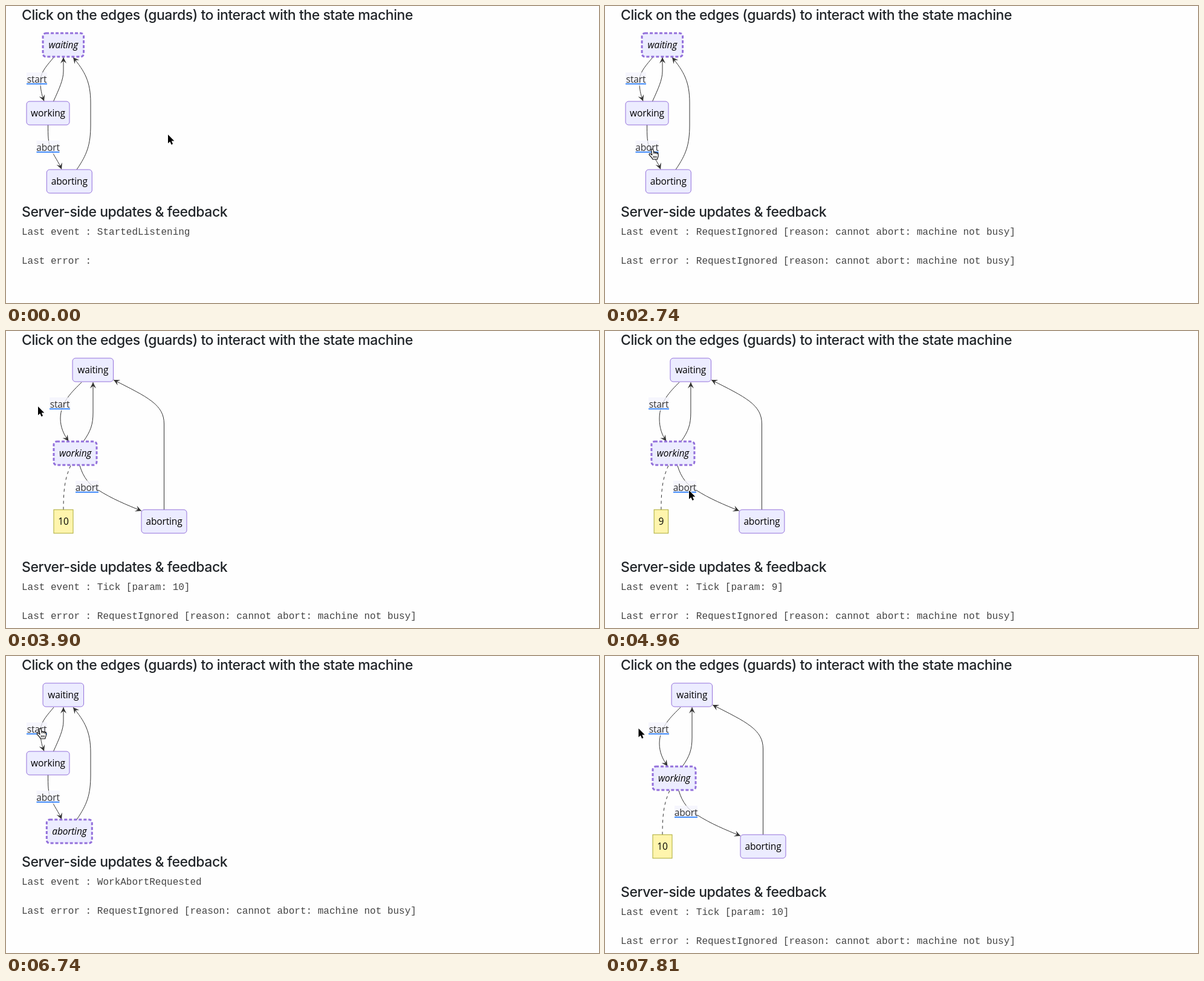
Write an HTML page that moves like this. It is 981 by 492 pixels and loops after 8000 ms.

```html
<!DOCTYPE html>
<html lang="en">
<head>
<meta charset="utf-8">
<title>State machine</title>
<style>
  html, body { margin: 0; height: 100%; overflow: hidden; background: #fefefe; }
  svg { display: block; }
  text { white-space: pre; }
  .title { font: 500 23px Inter, sans-serif; letter-spacing: -.45px; fill: #212529; }
  .log { font: 16px "Liberation Mono", monospace; fill: #444; }
  .node, .label { font: 500 15.5px "Open Sans", sans-serif; letter-spacing: -.15px; text-anchor: middle; }
  .node rect { fill: #ececff; stroke: #9370db; }
  .node.active { font-style: italic; }
  .node.active rect { stroke-width: 3; stroke-dasharray: 5 3; }
  .node.note rect { fill: #fff5ad; stroke: #aaaa33; }
  .label { font-weight: 400; fill: #333; }
  .label rect { fill: #f3f3fd; opacity: .75; }
  .label line { stroke: #0d6efd; stroke-width: 1.6; }
  .edge { fill: none; stroke: #333; }
</style>
</head>
<body>
<svg width="981" height="492" viewBox="0 0 981 492">
  <defs>
    <marker id="barb" markerWidth="20" markerHeight="14" refX="19" refY="7" markerUnits="userSpaceOnUse" orient="auto">
      <path d="M19 7 9 12 13 7 9 2Z" fill="#333"/>
    </marker>
  </defs>
  <text class="title" x="26" y="23">Click on the edges (guards) to interact with the state machine</text>
  <g id="diagram"></g>
  <g id="feedback">
    <text class="title" x="26" y="349">Server-side updates &amp; feedback</text>
    <text class="log" id="event" x="26" y="379"></text>
    <text class="log" id="error" x="26" y="427"></text>
  </g>
  <circle id="ring" r="9.5" fill="none" stroke="#000" stroke-opacity=".5" stroke-width="1.2"/>
  <path id="arrow" d="M0 0V14.5L3.3 11.4 5.6 16.7 8 15.6 5.8 10.4H10.3Z" stroke="#fff" stroke-width="1.4" paint-order="stroke"/>
  <g id="hand" stroke="#000" stroke-width="1.1" stroke-linejoin="round">
    <path fill="#fff" d="M-2.2 1.8C-2.4-.3 .6-.5 1 1.3L2 5.6C2.5 4.6 4.4 4.6 4.8 6 5.5 5.2 7 5.4 7.3 6.6 8.2 6 9.4 6.6 9.4 8V11C9.4 13 8 14 7.8 17H0C-.4 15-3 12.6-5.4 9.8-6.6 8-4.4 6.8-2.8 8.4L-.9 10Z"/>
    <path fill="none" d="M2 5.6 2.6 8M4.8 6 5.2 8.2M7.3 6.6 7.5 8.6M1.4 11.5V14.6M3.7 11.5V14.6M6 11.5V14.6"/>
  </g>
</svg>
<script>
const LOOP = 8000;
const $ = id => document.getElementById(id);

const ignored = "RequestIgnored [reason: cannot abort: machine not busy]";
// start time, active state, last event, last error, counter
const scenes = [
  [0, "waiting", "StartedListening", ""],
  [1390, "waiting", ignored, ignored],
  [3900, "working", "Tick [param: 10]", ignored, 10],
  [4960, "working", "Tick [param: 9]", ignored, 9],
  [5490, "aborting", "WorkAbortRequested", ignored],
  [7100, "waiting", "WorkAborted", ignored],
  [7810, "working", "Tick [param: 10]", ignored, 10],
];

// first step, last step, step count, end point
const moves = [
  [360, 850, 7, 50, 237],
  [2200, 2290, 2, 82, 237],
  [2740, 2830, 2, 75.5, 237],
  [3100, 3630, 7, 53, 125],
  [4610, 4790, 3, 306, 218],
  [4870, 4960, 2, 139, 264],
  [5050, 5220, 3, 139, 262],
  [6210, 6740, 7, 57, 120],
  [7810, 7811, 1, 55.5, 120],
];
const handSpans = [[850, 3190], [3540, 3900], [5130, 5580], [6650, 7810]];
const clickSpans = [[1210, 1390], [3720, 3900], [5310, 5490], [7730, 7810]];
const within = (spans, t) => spans.some(([a, b]) => t >= a && t < b);

const edge = (d, extra = 'marker-end="url(#barb)"') => `<path class="edge" d="${d}" ${extra}/>`;

function node(name, x, y, width, active, kind = "") {
  return `<g class="node ${kind} ${name === active ? "active" : ""}">
    <rect x="${x - width / 2}" y="${y}" width="${width}" height="39" rx="${kind ? 0 : 5}"/>
    <text x="${x}" y="${y + 25}">${name}</text></g>`;
}

function label(name, x, y, width) {
  const left = x - width / 2;
  return `<g class="label"><rect x="${left}" y="${y - 12}" width="${width}" height="22"/>
    <text x="${x}" y="${y + 5}">${name}</text>
    <line x1="${left}" x2="${left + width}" y1="${y + 7}" y2="${y + 7}"/></g>`;
}

function idleDiagram(active) {
  return edge("M79 85C70 96 58 108 57 122 56.5 137 59 147 63 157.5") +
    edge("M78.5 158C88 137 95 122 95 108V85") +
    edge("M69.5 197C69.5 213 69.5 227 74 236 80 250 87 258 92 270.5") +
    edge("M117 271C134 246 140 230 140 197V160C140 125 130 108 111 85") +
    label("start", 51, 122, 34) + label("abort", 69.5, 235, 38) +
    node("waiting", 94.8, 45, 67.5, active) +
    node("working", 69.5, 158, 71, active) +
    node("aborting", 104.8, 271, 75, active);
}

function busyDiagram(active, count) {
  const s = count < 10 ? -2.1 : 0;
  return edge(`M${125 + s} 85C${110 + s} 100 90 118 90 145 90 160 ${96 + s} 172 ${103.5 + s} 182.5`) +
    `<g transform="translate(${s})">` +
    edge("M128 183C140 166 144 155 144 135V85") +
    edge("M122 223C128 243 138 255 152 263 175 278 200 288 224 298") +
    edge("M261.5 296V154C261.5 122 235 110 178 81") +
    edge("M107 223C98 243 95 260 95 296", 'stroke-dasharray="5"') +
    label("abort", 134, 260, 38) +
    node("waiting", 143.8, 45, 67.5, active) +
    node("working", 114.5, 183, 71, active) +
    node("aborting", 261.5, 296, 75, active) +
    node(count, 95, 296, count < 10 ? 23.5 : 32, active, "note") +
    "</g>" + label("start", 89, 122, 34);
}

function showScene([, active, event, error, count]) {
  $("diagram").innerHTML = count ? busyDiagram(active, count) : idleDiagram(active);
  $("feedback").setAttribute("transform", `translate(0 ${count ? 50 : 0})`);
  $("event").textContent = "Last event : " + event;
  $("error").textContent = "Last error : " + error;
}

function pointerAt(t) {
  let x = 268, y = 213;
  for (const [start, end, steps, toX, toY] of moves) {
    if (t < start) break;
    const step = Math.floor((t - start) / (end - start) * (steps - 1) + 1.001);
    const p = Math.min(1, step / steps);
    const eased = steps > 3 ? p * p * (3 - 2 * p) : p;
    x += (toX - x) * eased;
    y += (toY - y) * eased;
  }
  return [x, y];
}

let shown;
function draw() {
  const t = performance.now() % LOOP;
  const scene = scenes.findLast(s => t >= s[0]);
  if (scene !== shown) showScene(shown = scene);

  const place = `translate(${pointerAt(t)})`;
  const isHand = within(handSpans, t);
  for (const [id, visible] of [["arrow", !isHand], ["hand", isHand], ["ring", within(clickSpans, t)]]) {
    $(id).setAttribute("transform", place);
    $(id).setAttribute("visibility", visible ? "visible" : "hidden");
  }
  requestAnimationFrame(draw);
}
draw();
</script>
</body>
</html>
```
